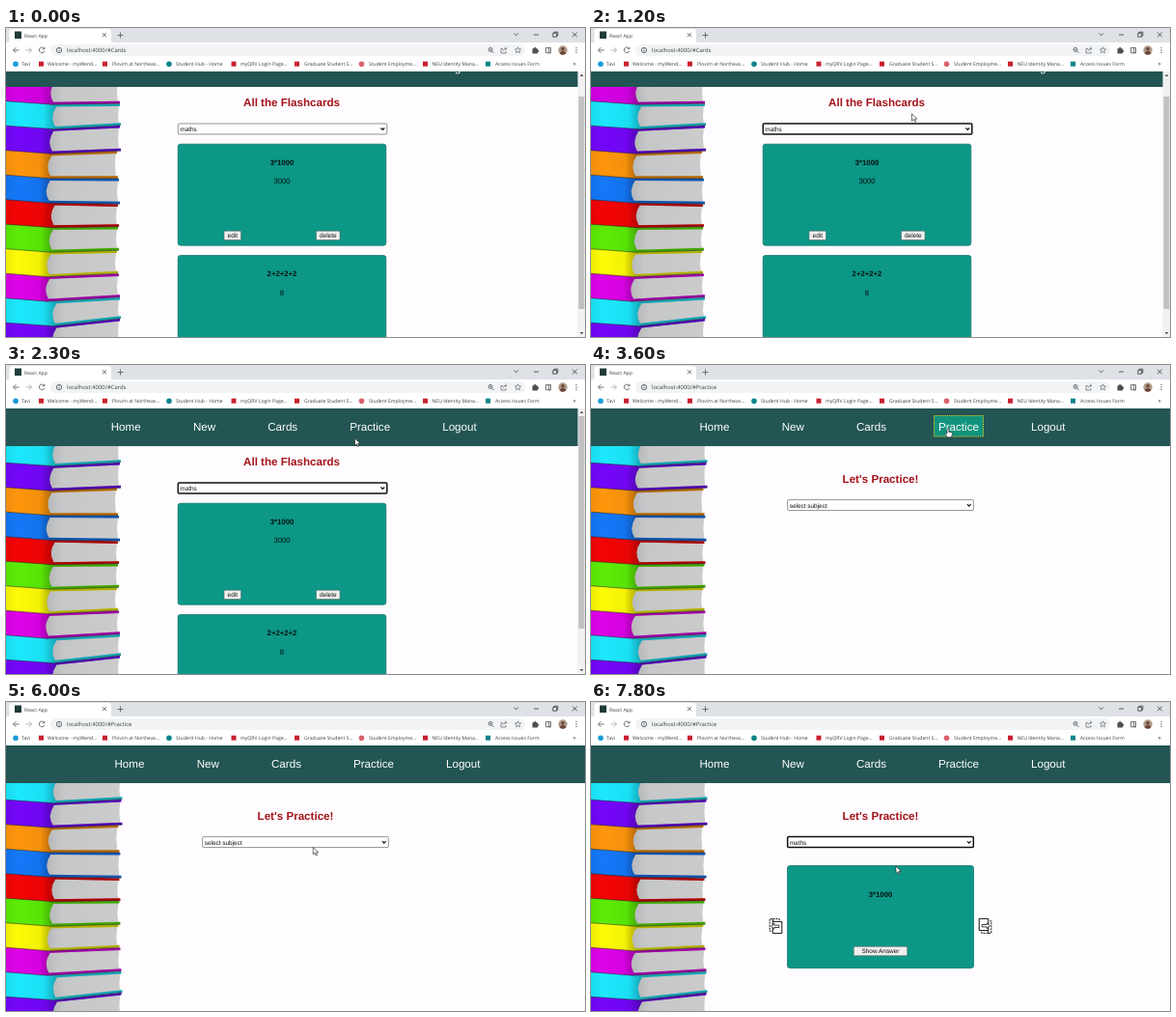
Write an HTML page that moves like this. It is 600 px wide and 320 px high and loops after 8 s.

```html
<!DOCTYPE html>
<html lang="en">
<head>
<meta charset="utf-8">
<title>Flashcards</title>
<style>
  html, body { margin: 0; width: 100%; height: 100%; overflow: hidden; background: #fefcfe; }
  svg { display: block; width: 100vw; height: 100vh; }
  text { font-family: "Liberation Sans", Arial, sans-serif; text-rendering: geometricPrecision; }
  .ui { font-family: "Open Sans", "Noto Sans", sans-serif; font-size: 5.1px; fill: #3c4043; }
  .icon { fill: none; stroke: #5f6368; stroke-width: .9; }
  .nav { font-size: 11.6px; fill: #fff; }
  .title { font-size: 11.6px; font-weight: bold; fill: #a3131b; text-anchor: middle; }
  .control { font-size: 6.45px; fill: #111; }
  .card { font-size: 7.75px; fill: #06110f; text-anchor: middle; }
</style>
</head>
<body>
<svg viewBox="0 0 600 320" preserveAspectRatio="none">
  <defs>
    <clipPath id="viewport"><rect y="45" width="600" height="275"/></clipPath>
    <linearGradient id="spine">
      <stop offset="0" stop-color="#000" stop-opacity=".06"/>
      <stop offset=".25" stop-color="#000" stop-opacity="0"/>
      <stop offset=".75" stop-color="#000" stop-opacity=".04"/>
      <stop offset="1" stop-color="#000" stop-opacity=".3"/>
    </linearGradient>
    <linearGradient id="pages">
      <stop offset="0" stop-color="#b4b5b7"/>
      <stop offset=".2" stop-color="#c6c7c8"/>
      <stop offset="1" stop-color="#cbcbcb"/>
    </linearGradient>
  </defs>
  <g clip-path="url(#viewport)">
    <rect y="45" width="600" height="275" fill="#fefcfe"/>
    <g id="books"></g>
    <g id="cards"></g>
    <g id="practice"></g>
    <g id="nav"></g>
    <g id="scrollbar"></g>
  </g>
  <g id="browser"></g>
  <path id="arrow" d="M0 0V7.4L1.8 5.8L3 8.5L4.2 8L3 5.3H5.3Z" fill="#fff" stroke="#222" stroke-width=".65"/>
  <path id="hand" d="M-.9 .8Q0-.8 .9 .8V3.5L3.7 4.1Q4.6 4.4 4.4 5.4L3.5 9H-.6L-3 5.6Q-2.6 4.2-.9 5.5Z" fill="#fff" stroke="#222" stroke-width=".6"/>
</svg>
<script>
const LOOP = 8000, SCROLLED = 23;
const $ = id => document.getElementById(id);
const rect = (x, y, w, h, fill, more = '') =>
  `<rect x="${x}" y="${y}" width="${w}" height="${h}" fill="${fill}" ${more}/>`;
const label = (x, y, text, cls, more = '') => `<text x="${x}" y="${y}" class="${cls}" ${more}>${text}</text>`;
const icon = (d, more = '') => `<path class="icon" d="${d}" ${more}/>`;
const dot = (x, y, r, fill) => `<circle cx="${x}" cy="${y}" r="${r}" fill="${fill}"/>`;

// color, where the pages meet the spine, right end, rise of the lower cover
const stack = [
  ['#d400e4', 46, 117, 1], ['#1ce8fd', 48, 118, 4], ['#7406fa', 45, 118, 3], ['#ff960c', 43, 115, 0],
  ['#1478f8', 41.5, 117, -1], ['#f40404', 46.5, 116, 1], ['#5cec06', 44.5, 116, 2], ['#fdfb06', 42, 115, 3.5],
  ['#de02e8', 41, 117, 4.5], ['#1ce8fd', 48, 118, 8], ['#7406fa', 48, 118, 6]
];
const PITCH = 25.5;

function book([color, hinge, right, rise], i) {
  const bottom = 79.2 + PITCH * i, top = bottom - PITCH;
  const topRight = top - (i ? stack[i - 1][3] : 0) + 1.5, bottomRight = bottom - rise;
  const spine = `M0 ${top - 5}L${hinge + 4} ${top - 2}V${top + 2.5}Q${hinge - 3} ${top + 13} ${hinge + 3} ${bottom - 2.5}
    L${hinge + 2} ${bottom}L0 ${bottom - 3.5}Z`;
  const upper = `M${hinge} ${top + 1}L${right} ${topRight}`;
  const lower = `M${hinge} ${bottom - 1.2}L${right + 1} ${bottomRight - 1.2}`;
  const cover = d => `<path d="${d}" stroke="${color}" stroke-width="2.4"/><path d="${d}" stroke="#000" stroke-opacity=".3" stroke-width="2.4"/>`;
  return `<path d="M${hinge - 2} ${top - 4}L${right - 1} ${topRight - 4}V${topRight}L${right - 2} ${topRight + 12}L${right - 1} ${bottomRight - 1}L${hinge - 2} ${bottom - 1}Z" fill="url(#pages)"/>
    ${cover(upper)}${cover(lower)}
    <path d="${spine}" fill="${color}"/><path d="${spine}" fill="url(#spine)"/>
    <path d="M0 ${bottom - 3.5}L${hinge + 2} ${bottom}L${right + 1} ${bottomRight}" fill="none" stroke="#222" stroke-opacity=".65" stroke-width=".8"/>`;
}

function select(id, x, y, w, value) {
  return rect(x, y, w, 11, '#fff', `id="${id}" rx="1"`)
    + label(x + 2, y + 7.9, value, 'control', `id="${id}Value"`)
    + `<path d="M${x + w - 6.4} ${y + 4.5}l1.9 2 1.9-2" fill="none" stroke="#111" stroke-width="1.1"/>`;
}

const button = (x, y, w, text) =>
  rect(x, y, w, 9.4, '#efefef', 'rx="1" stroke="#5d6664" stroke-width=".6"')
  + label(x + w / 2, y + 7, text, 'control', 'text-anchor="middle"');

const panel = (x, y, w, h) =>
  rect(x, y, w, h, '#0c9787', 'rx="2.5" stroke="#0b6e63" stroke-width=".7"');

function flashcard(y, question, answer) {
  return panel(178.2, y, 215.6, 105)
    + label(286, y + 21.7, question, 'card', 'font-weight="bold"')
    + label(286, y + 41, answer, 'card')
    + button(226, y + 90, 17.5, 'edit') + button(321.5, y + 90, 24.5, 'delete');
}

const turnIcon = (x, y, angle) => `<g transform="translate(${x} ${y}) rotate(${angle})" fill="none" stroke="#111">
  <path d="M-3-4.8V-7.4H-6.3V5.2H-4M-3-7.4H3.8V-5" stroke-width="1" stroke-dasharray="2 1"/>
  <path d="M-3.2-4.6H6.3V7.6H-3.2Z" fill="#fff" stroke-width="1"/>
  <path d="M-4.8 .3L-1.6-2.6V-.9H3.4V1.5H-1.6V3.2Z" fill="#fff" stroke-width=".8"/></g>`;

// upper books overlap the ones below
$('books').innerHTML = stack.map(book).reverse().join('');

$('cards').innerHTML = label(296, 104, 'All the Flashcards', 'title')
  + select('subject', 178.3, 122, 216.5, 'maths')
  + flashcard(143.2, '3*1000', '3000') + flashcard(258.5, '2+2+2+2', '8');

$('practice').innerHTML = label(300, 121.7, "Let's Practice!", 'title')
  + select('topic', 203.7, 139.6, 192.6, 'select subject')
  + `<g id="quiz">${panel(203.5, 169.5, 193, 106)}`
  + label(300, 201.8, '3*1000', 'card', 'font-weight="bold"')
  + button(272.3, 253.3, 55.4, 'Show Answer')
  + turnIcon(191.5, 232, 0) + turnIcon(408.5, 232, 180) + '</g>';

const links = [['Home', 112.5], ['New', 197.7], ['Cards', 275], ['Practice', 360], ['Logout', 456]];
$('nav').innerHTML = rect(0, 45, 600, 39, '#225553')
  + `<g id="links">${rect(355.5, 52.5, 51, 21.5, '#11937e', 'id="highlight" stroke="#e4d21c" stroke-width="1" stroke-dasharray="1.2 1"')}`
  + links.map(([name, x]) => label(x, 67.6, name, 'nav')).join('') + '</g>';

$('scrollbar').innerHTML = rect(592.5, 45, 7.5, 275, '#f1f1f1')
  + rect(593.3, 53, 6, 220, '#c1c1c1', 'id="thumb"')
  + '<path d="M594.5 50l2-2.3 2 2.3ZM594.5 315l2 2.3 2-2.3Z" fill="#555"/>';

const red = '#c9202e', teal = '#08848a';
const bookmarks = [
  ['Tavi', 16, 10, '#189bd8', 1], ['Welcome - myWend...', 43, 36.5, red], ['Plovim at Northeas...', 110, 102.5, red],
  ['Student Hub - Home', 176, 169, teal, 1], ['myQRV Login Page...', 243, 236, red],
  ['Graduate Student S...', 309, 301.5, red], ['Student Employme...', 376, 368.5, '#d9606a', 1],
  ['NEU Identity Mana...', 441.5, 434.5, red], ['Access Issues Form', 507, 499.5, teal]
];
$('browser').innerHTML = rect(0, 0, 600, 16, '#dee1e6')
  + '<path d="M1 16Q3.5 16 3.5 13V4Q3.5 1 6.5 1H106Q109 1 109 4V13Q109 16 111.5 16Z" fill="#fff"/>'
  + rect(0, 15, 600, 30, '#fff')
  + rect(9, 3.5, 7, 7.5, '#203b3a')
  + label(19, 9.8, 'React App', 'ui')
  + icon('M100 5.2l4 4m0-4l-4 4M115.5 7.5h6m-3-3v6')
  + icon('M526.5 5.5l2.2 2.2 2.2-2.2M547 7h5M566.8 5.4h3.8v3.8h-3.8ZM568 5.2v-1h3.8v3.8h-1M587 4.5l4.8 4.8m0-4.8l-4.8 4.8', 'style="stroke:#222;stroke-width:.7"')
  + rect(46, 17, 492, 12, '#f1f3f4', 'rx="6"')
  + icon('M13.5 23H7.5m2.8-2.8L7.5 23l2.8 2.8')
  + icon('M20.5 23h6m-2.8-2.8l2.8 2.8-2.8 2.8', 'opacity=".5"')
  + icon('M39.4 21.2A2.8 2.8 0 1 0 39.7 24M39.9 19.8v2h-2')
  + '<circle class="icon" cx="55" cy="23" r="2.7"/>' + icon('M55 22.5v2M55 21v.7')
  + label(63, 25, '', 'ui', 'id="address" style="font-size:5.9px"')
  + '<circle class="icon" cx="502" cy="22.4" r="2"/>' + icon('M503.5 24l2 2M501 22.4h2')
  + icon('M515 21.5h-2v4.5h5v-2M515 23.8q.5-2.6 3.7-2.6m-1.6-1.7l1.7 1.7-1.7 1.7', 'style="stroke-width:.7"')
  + icon('M530.5 19.8l.9 2 2.2.2-1.7 1.5.5 2.2-1.9-1.1-1.9 1.1.5-2.2-1.7-1.5 2.2-.2Z', 'style="stroke-width:.7"')
  + '<path d="M545.5 21.3h1.6q0-1.6 1.1-1.6t1.1 1.6h1.6v1.5q1.3.1 1.3 1.1t-1.3 1.1v1.5h-5.4Z" fill="#4b4f52"/>'
  + icon('M559.5 20.4h5v5.4h-5ZM562.7 20.4v5.4h1.8')
  + dot(577, 23, 4.7, '#b09a88') + dot(577, 21.8, 1.8, '#6b463a')
  + '<path d="M573.6 26.2Q577 21.5 580.4 26.2Q577 29.2 573.6 26.2Z" fill="#6b463a"/>'
  + [20.6, 23, 25.4].map(y => dot(591, y, .65, '#4b4f52')).join('')
  + bookmarks.map(([text, x, mark, color, round]) =>
      (round ? dot(mark, 37.2, 2.8, color) : rect(mark - 2.5, 34.7, 5, 5, color)) + label(x, 39, text, 'ui')).join('')
  + label(587.5, 39.2, '»', 'ui', 'style="font-size:6.5px"');

// [time, x, y] of the pointer; it holds until the next entry
const pointer = [
  [700, 322, 104], [900, 328, 98], [1000, 331, 93], [1200, 332.5, 88.8],
  [1500, 338, 86], [1600, 346, 82], [1700, 353, 80], [1800, 358, 78], [2300, 361.6, 76],
  [3300, 370, 65.8], [3800, 352, 91], [4500, 330, 111], [5000, 326, 128], [5400, 322, 140],
  [5600, 320, 146], [6000, 318.3, 150.5], [7300, 318, 154], [7400, 317, 162], [7800, 316, 170]
];
const scrolling = [[0, SCROLLED], [1500, 18], [1600, 10], [1700, 3], [1800, 0]];
const at = (steps, t) => steps.filter(s => s[0] <= t).pop();

const show = (id, on) => $(id).setAttribute('display', on ? 'inline' : 'none');
const move = (id, x, y) => $(id).setAttribute('transform', `translate(${x} ${y})`);

function focus(id, on) {
  $(id).setAttribute('stroke', on ? '#111' : '#767676');
  $(id).setAttribute('stroke-width', on ? 1.5 : .8);
}

function render(t) {
  const practicing = t >= 3600, answered = t >= 7300;
  const highlighted = t >= 3300 && t < 5600;
  const scroll = at(scrolling, t)[1];

  show('cards', !practicing);
  show('practice', practicing);
  show('scrollbar', !practicing);
  show('quiz', answered);
  show('highlight', highlighted);
  $('address').textContent = 'localhost:4000/#' + (practicing ? 'Practice' : 'Cards');
  $('topicValue').textContent = answered ? 'maths' : 'select subject';
  focus('subject', t >= 300);
  focus('topic', t >= 7400);

  move('cards', 0, -scroll);
  move('nav', 0, -scroll);
  move('links', practicing ? 0 : -3.8, 0);
  move('thumb', 0, scroll * 18 / SCROLLED);
  $('books').setAttribute('transform', `scale(${practicing ? 1.012 : 1} 1)`);

  const tip = at(pointer, t), pressing = t >= 3300 && t < 3800;
  show('arrow', tip && !pressing);
  show('hand', pressing);
  if (tip) move(pressing ? 'hand' : 'arrow', tip[1], tip[2]);
}

const start = performance.now();
function tick() {
  render((performance.now() - start) % LOOP);
  requestAnimationFrame(tick);
}
tick();
</script>
</body>
</html>
```
